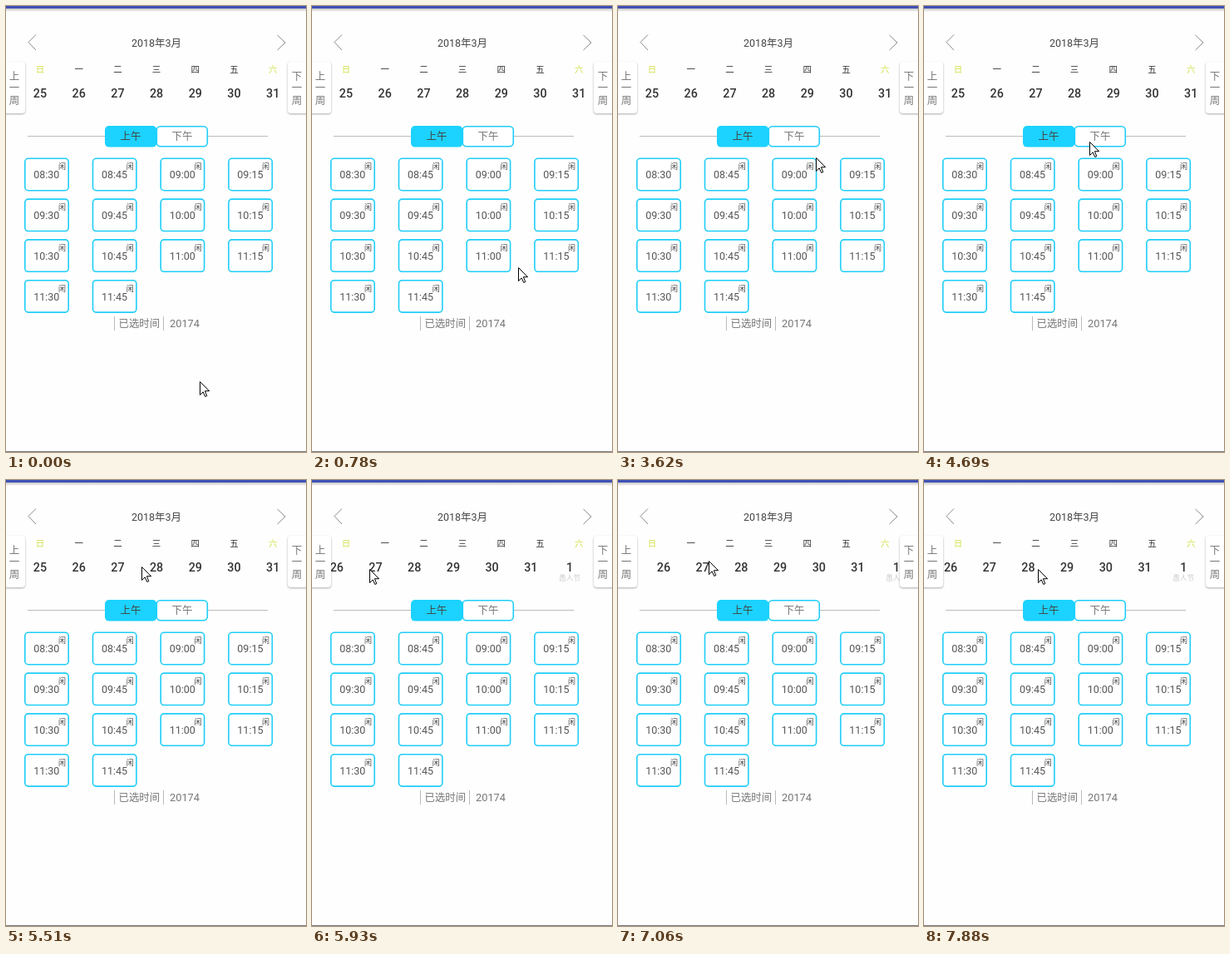
An HTML page for the animation above (8000 ms loop, 361 by 536 pixels).

```html
<!DOCTYPE html>
<html lang="zh-CN">
<head>
<meta charset="utf-8">
<style>
html, body { margin: 0; width: 100%; height: 100%; overflow: hidden; background: #fefefe; }
svg { display: block; width: 361px; height: 536px; font-family: Roboto, "Noto Sans CJK SC", "Noto Sans CJK", sans-serif; }
.tab { fill: #fff; filter: drop-shadow(0 1px 1.2px #0005); }
.slot { fill: #fff; stroke: #1fcdf8; stroke-width: 1.6; }
.thin { fill: none; stroke: #bbb; }
</style>
</head>
<body>
<svg id="stage" viewBox="0 0 361 536">
  <defs>
    <linearGradient id="fade" x2="0" y2="1">
      <stop stop-color="#c4c4c4"/><stop offset="1" stop-color="#fefefe"/>
    </linearGradient>
  </defs>
  <rect width="361" height="536" fill="#fefefe"/>
  <rect y="3" width="361" height="4" fill="url(#fade)"/>
  <rect width="361" height="3" fill="#3f51b5"/>
  <path class="thin" d="M0 535.5H361" style="stroke:#777"/>
  <path class="thin" d="M36 34.5L27 43.5L36 53M326.5 35L336 44L326.5 53" style="stroke:#888"/>
  <path class="thin" d="M26 156.5H119M243 156.5H315M130.5 373V390M189.5 373V390"/>
  <g id="strip"></g>
  <rect class="tab" x="-5" y="67" width="28" height="62" rx="4"/>
  <rect class="tab" x="339" y="67" width="28" height="62" rx="4"/>
  <rect class="slot" x="181.3" y="144.8" width="61" height="24" rx="4.5"/>
  <rect x="119" y="144" width="62.3" height="25.6" rx="5" fill="#1cd2ff"/>
  <g id="labels"></g>
  <path id="cursor" fill="#fff" stroke="#000" d="M.5 .5V16.5L4.2 12.8L6.7 18.4L8.8 17.6L6.4 11.7H11.6Z"/>
</svg>
<script>
const $ = id => document.getElementById(id);
const strip = $('strip'), labels = $('labels'), cursor = $('cursor');

function add(parent, tag, attrs, content = '') {
  const node = document.createElementNS('http://www.w3.org/2000/svg', tag);
  for (const key in attrs) node.setAttribute(key, attrs[key]);
  node.textContent = content;
  parent.append(node);
}
const text = (parent, content, x, y, size, fill, weight = 400, anchor = 'middle') =>
  add(parent, 'text', { x, y, 'font-size': size, fill, 'font-weight': weight, 'text-anchor': anchor }, content);

// Calendar header and dates
const DAY = 46.7, FIRST_X = 41;
text(labels, '2018年3月', 181, 48.7, 12.5, '#444');
[...'日一二三四五六'].forEach((name, i) =>
  text(labels, name, FIRST_X + i * DAY, 80, 10.5, i % 6 ? '#333' : '#d3e04c'));
for (let i = 0; i < 9; i++)
  text(strip, (24 + i) % 31 + 1, FIRST_X + i * DAY, 110, 14.3, '#333', 500);
text(strip, '愚人节', FIRST_X + 7 * DAY, 121, 8.7, '#ccc');

[['上一周', 10], ['下一周', 350]].forEach(([word, x]) =>
  [...word].forEach((c, i) => text(labels, c, x, 89 + i * 14.4, 12.5, '#777')));
text(labels, '上午', 150, 161.4, 12.5, '#444');
text(labels, '下午', 212, 161.4, 12.5, '#777');

// Time slots every quarter of an hour
const pad = n => String(n).padStart(2, '0');
for (let i = 0; i < 14; i++) {
  const x = 22.8 + i % 4 * 81.7, y = 183.3 + (i >> 2) * 48.8, minutes = 510 + i * 15;
  add(labels, 'rect', { class: 'slot', x, y, width: 52.4, height: 38.4, rx: 4 });
  text(labels, pad(minutes / 60 | 0) + ':' + pad(minutes % 60), x + 26, y + 23.9, 12.5, '#555');
  text(labels, '闲', x + 44.7, y + 13, 9, '#444');
}
text(labels, '已选时间', 135.5, 386.3, 12.4, '#777', 400, 'start');
text(labels, '20174', 197, 386.3, 12.8, '#777', 400, 'start');

// Pointer turning points: time, x, y; each leg eases in and out
const GRAB_TIME = 5490, GRAB_X = 163;
const stops = [
  [0, 233, 451], [270, 233, 451], [780, 250, 299], [1900, 246, 299], [2460, 258, 228],
  [3200, 267, 227], [3570, 238, 182], [4270, 231, 195], [4690, 199, 163], [5230, GRAB_X, 104],
  [GRAB_TIME, GRAB_X, 104], [6064, 55, 108], [6558, 158, 96], [7460, 68, 98], [8000, 149, 108.5]
];
function pointer(t) {
  const next = stops.findIndex(stop => stop[0] > t);
  const [t0, x0, y0] = stops[next - 1], [t1, x1, y1] = stops[next];
  const k = (1 - Math.cos(Math.PI * (t - t0) / (t1 - t0))) / 2;
  return [x0 + (x1 - x0) * k, y0 + (y1 - y0) * k];
}

// The screen refreshes in even steps; dragged dates trail the pointer by one
const LOOP = 8000, STEP = 138.2, PHASE = 124;
function draw(now) {
  const t = now % LOOP;
  const tick = Math.max(0, PHASE + Math.floor((t - PHASE) / STEP) * STEP);
  const [x, y] = pointer(tick).map(Math.round);
  cursor.setAttribute('transform', `translate(${x} ${y})`);
  const late = tick - STEP;
  const shift = late < GRAB_TIME ? 0 : pointer(late)[0] - GRAB_X;
  strip.setAttribute('transform', `translate(${shift} 0)`);
}

const start = performance.now();
function loop() {
  draw(performance.now() - start);
  requestAnimationFrame(loop);
}
loop();
</script>
</body>
</html>
```
